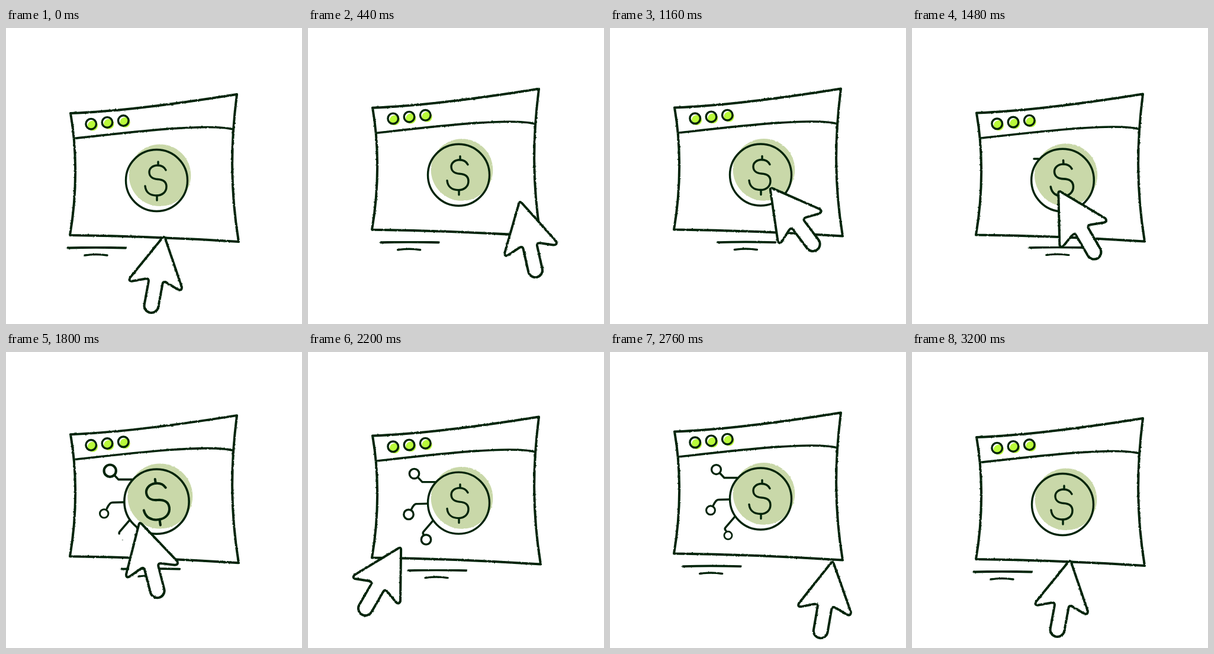
An HTML page that plays this animation: 500 px wide and 500 px high, repeating every 3.24 s.

```html
<!DOCTYPE html>
<html lang="en">
<head>
<meta charset="utf-8">
<title>Click to pay</title>
<style>
  html, body { margin: 0; width: 100%; height: 100%; overflow: hidden; background: #fff; }
  svg { display: block; width: 100vw; height: 100vh; }
  .ink { fill: none; stroke: #02240a; stroke-width: 3.4; stroke-linecap: round; stroke-linejoin: round; }
  .bold { stroke-width: 4; }
  .link path { stroke-dasharray: 1 2; }
</style>
</head>
<body>
<svg viewBox="0 0 500 500">
  <defs>
    <filter id="rough" color-interpolation-filters="sRGB">
      <feTurbulence type="fractalNoise" baseFrequency="0.3" numOctaves="2" seed="4"/>
      <feDisplacementMap in="SourceGraphic" scale="2.4" xChannelSelector="R" yChannelSelector="G"/>
    </filter>
  </defs>

  <g id="scene">
    <g id="shadow" class="ink" filter="url(#rough)">
      <path d="M104.500 371.500Q150 370 202 371.500" stroke-width="3.8"/>
      <path d="M133 384Q152 381 171 384"/>
    </g>
    <g class="ink bold" filter="url(#rough)">
      <path d="M109 144C190 141 290 128 390 112C380 190 378 270 393 361C300 355 200 351 108 350C121 275 119 200 109 144Z"/>
      <path d="M116 186.500C200 177 340 160 383 171" stroke-width="3.6"/>
    </g>
    <g id="dots"></g>

    <g id="coin">
      <g id="links" class="ink"></g>
      <circle cx="260" cy="248.800" r="52.300" fill="#c9d8a9" filter="url(#rough)"/>
      <circle class="ink" cx="254.500" cy="257.500" r="52"/>
      <g id="dollar" class="ink">
        <path d="M270 240C267 234 262 232 256 232C248 232 242 237 242 243.500C242 251 248 255 256 255.500C265 256 271 260 271 268C271 277 264 283 254 283C243 283 236 277 235 267"/>
        <path d="M257 226V232M255 283V291"/>
      </g>
    </g>
  </g>

  <g filter="url(#rough)">
    <path id="cursor" class="ink bold" style="fill:#fff"
      d="M-3 4Q0 -2 3 4L45 79Q46 86 39 84L18 76Q12 74 12 80V119A12 12 0 0 1 -12 119V80Q-12 74 -18 76L-39 84Q-46 86 -44 79Z"/>
  </g>
</svg>

<script>
const LOOP = 3240, END = 3200, STEP = 40;
const $ = id => document.getElementById(id);

function add(parent, tag, attrs) {
  const el = document.createElementNS('http://www.w3.org/2000/svg', tag);
  for (const k in attrs) el.setAttribute(k, attrs[k]);
  return parent.appendChild(el);
}

const span = (t, from, length) => Math.min(1, Math.max(0, (t - from) / length));
const smooth = u => u * u * (3 - 2 * u);
const overshoot = u => 1 + 3.4 * (u - 1) ** 3 + 2.4 * (u - 1) ** 2;

// The window rises gently and drops faster
function bob(t) {
  const phase = t % 800 / 800;
  const lift = (1 - Math.cos(2 * Math.PI * phase)) / 2;
  return -9.7 * (phase < 0.5 ? lift : lift * lift);
}

function slide(t) {
  const u = 1 - Math.abs(t / END * 2 - 1);
  return 96 * (0.9 * smooth(u) + 0.1 * u);
}

// Swell of the coin after the click
const swell = t => Math.sin(Math.PI * span(t, 1360, 700)) ** 2;

// Pointer poses: time, tip x, tip y, angle
const POSES = [
  [0, 267, 352, 10.4], [440, 358, 293, -12.6], [640, 387, 279, -22],
  [1160, 271, 270, -37], [1800, 226, 288, -14.4], [2200, 156.5, 330, 30],
  [2760, 376, 354, 9.8], [2810, 392, 359, 9]
];
POSES.push([END, ...POSES[0].slice(1)]);

// Monotone cubic through one column of the poses
function pose(t, col) {
  const last = POSES.length - 1;
  const slope = k => (POSES[k + 1][col] - POSES[k][col]) / (POSES[k + 1][0] - POSES[k][0]);
  const tangent = k => {
    if (k === 0 || k === last) return 0;
    const a = slope(k - 1), b = slope(k);
    return a * b <= 0 ? 0 : 2 * a * b / (a + b);
  };
  let i = 0;
  while (i < last - 1 && POSES[i + 1][0] <= t) i++;
  const h = POSES[i + 1][0] - POSES[i][0];
  const u = span(t, POSES[i][0], h), v = 1 - u;
  return POSES[i][col] * smooth(v) + POSES[i + 1][col] * smooth(u)
       + h * u * v * (tangent(i) * v - tangent(i + 1) * u);
}

for (let i = 0; i < 3; i++) {
  const x = 143.7 + 27.3 * i, y = 162.2 - 2.8 * i;
  add($('dots'), 'circle', { cx: x + 2.8, cy: y + 2.8, r: 8.6, fill: '#b9fa3a' });
  add($('dots'), 'circle', { cx: x, cy: y, r: 8.8, class: 'ink' });
}

const links = [
  { d: 'M215 222H193L185.500 214', x: 179.5, y: 208 },
  { d: 'M202 258.500L183 259Q179 259 174.500 268.500', x: 170, y: 276.8 },
  { d: 'M210.500 288L195 306Q193 309 196 311.500', x: 199.5, y: 319.3 }
].map(({ d, x, y }, i) => {
  const g = add($('links'), 'g', { class: 'link' });
  return {
    x, y, on: 1590 + 95 * i, off: 2726 - 27 * i,
    line: add(g, 'path', { d, pathLength: 1 }),
    ring: add(g, 'circle', { r: 8.2, style: 'fill:#fff' })
  };
});

const about = (x, y, s, r = 0) => `translate(${x} ${y}) rotate(${r}) scale(${s}) translate(${-x} ${-y})`;
const place = (el, value) => el.setAttribute('transform', value);
const show = (el, on) => { el.style.visibility = on ? 'visible' : 'hidden'; };

function draw(t) {
  const s = swell(t);
  place($('scene'), `translate(0 ${bob(t)})`);
  place($('shadow'), `translate(${slide(t)} 0)`);
  place($('coin'), about(254.5, 257.5, 1 + 0.06 * s));
  place($('dollar'), about(255, 258, 1 + 0.17 * s, -10 * s));

  for (const { line, ring, x, y, on, off } of links) {
    const size = overshoot(span(t, on, 320) ** 1.5) * (1 - span(t, off, 200) ** 2);
    const drawn = span(t, on - 160, 200) - smooth(span(t, off + 110, 200));
    show(ring, size > 0.01);
    show(line, drawn > 0.01);
    place(ring, `translate(${x} ${y}) scale(${size})`);
    line.style.strokeDashoffset = 1 - drawn;
  }

  place($('cursor'), `translate(${pose(t, 1)} ${pose(t, 2)}) rotate(${pose(t, 3)})`);
}

const start = performance.now();
function tick() {
  const t = (performance.now() - start) % LOOP;
  draw(Math.floor(t / STEP) * STEP);
  requestAnimationFrame(tick);
}
tick();
</script>
</body>
</html>
```
